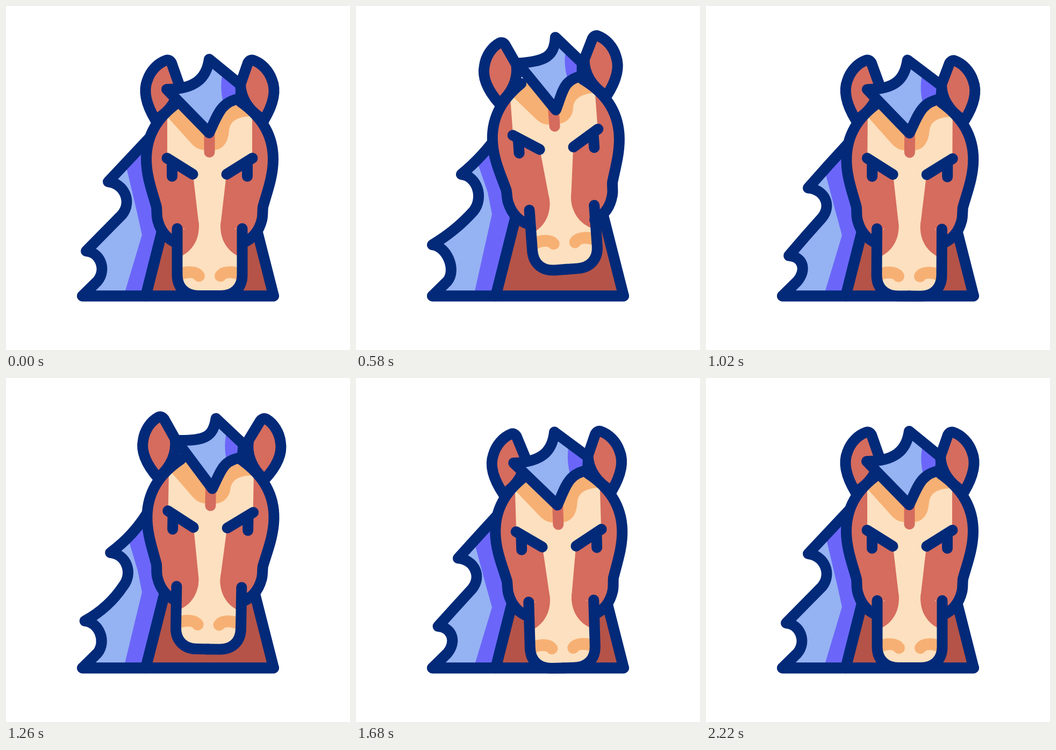
Recreate the animation shown at these times as an HTML page with a canvas. Size 640 by 640 pixels, loop 2.4 s.

```html
<!DOCTYPE html>
<html lang="en">
<head>
<meta charset="utf-8">
<title>Nodding horse</title>
<style>
  html, body { margin: 0; width: 100%; height: 100%; overflow: hidden; background: #fff; }
  canvas { display: block; width: 100vmin; height: 100vmin; }
</style>
</head>
<body>
<canvas width="640" height="640"></canvas>
<script>
const ctx = document.querySelector('canvas').getContext('2d');
const LOOP = 2400, STEP = 20, AXIS = 379, PIVOT_Y = 345, GROUND = 539.5;
const NAVY = '#022a79', COAT = '#d56c5e', NECK = '#b55348', CREAM = '#fce0bf',
      ORANGE = '#f7b073', SKY = '#95b2f3', VIOLET = '#6b66f9';

// Smooth track through key values, flat at every extreme; rests at 0 on both ends.
const times = [180, 360, 620, 780, 930, 1150, 1260, 1510, 1840, 2220];
function track(...inner) {
  const v = [0, ...inner, 0];
  const sec = i => (v[i + 1] - v[i]) / (times[i + 1] - times[i]);
  const slope = v.map((_, i) => {
    if (!i || i === v.length - 1) return 0;
    const a = sec(i - 1), b = sec(i);
    return a * b > 0 ? 2 * a * b / (a + b) : 0;
  });
  return t => {
    if (t <= times[0] || t >= times.at(-1)) return 0;
    const i = times.findIndex(k => k > t) - 1;
    const h = times[i + 1] - times[i], u = (t - times[i]) / h, w = 1 - u;
    return w * w * ((1 + 2 * u) * v[i] + u * h * slope[i]) +
           u * u * ((3 - 2 * u) * v[i + 1] - w * h * slope[i + 1]);
  };
}

const tracks = {
  skull: track(-11, -40, -8, 20, -33, -25.5, 13.5, -10.5),
  face:  track(-19, -50, -20.6, 25, -42, -34.5, 17, -14.5),
  tilt:  track(0, -5, -7.6, -3, 3.5, 1, -2.2, -1),
  splay: track(2.5, 7, 11, -6, 13, 11, -7, 9),
  tipX:  track(11, 14, 11, -14, 12, 8, -10, 6),
  tipY:  track(-14, -42, -13, 22, -34, -24, 16, -12),
  lockA: track(-7, -14, 3, 24, -10, -2, 22, -4),
  lockB: track(-6, -12, -1, 18, -8, -4, 18, -5),
  bend:  track(2, 4, 0, -3, 5, 6, -3.5, 3)
};

function draw(d, fill, stroke, width = 20) {
  const path = new Path2D(d);
  if (fill) { ctx.fillStyle = fill; ctx.fill(path); }
  if (stroke) { ctx.strokeStyle = stroke; ctx.lineWidth = width; ctx.stroke(path); }
}

function within(d, paint) {
  ctx.save();
  ctx.clip(new Path2D(d));
  paint();
  ctx.restore();
}

function flip(paint) {
  ctx.save();
  ctx.translate(2 * AXIS, 0);
  ctx.scale(-1, 1);
  paint();
  ctx.restore();
}

function both(paint) {
  paint();
  flip(paint);
}

function shifted(dx, dy, paint) {
  ctx.save();
  ctx.translate(dx, dy);
  paint();
  ctx.restore();
}

function rotated(degrees, x, y, paint) {
  ctx.save();
  ctx.translate(x, y);
  ctx.rotate(degrees * Math.PI / 180);
  ctx.translate(-x, -y);
  paint();
  ctx.restore();
}

function drawMane({ face, tilt, lockA, lockB, bend }) {
  const sx = 268, sy = 244 + lockA * .7;
  const ax = 190 - face * .12, ay = 327 + lockA;
  const ex = 216 - face * .06, ey = 388 + lockA * .5;
  const bx = 149 + lockB * .6, by = 456 + lockB;
  const curve = (x0, y0, x1, y1) =>
    `Q${(x0 + x1) / 2 + 1.4 * bend} ${(y0 + y1) / 2 + 1.4 * bend} ${x1} ${y1}`;
  const mane = `M${sx} ${sy}${curve(sx, sy, ax, ay)}
    C${ax + 30} ${ay + 3} ${ex + 19} ${ey - 24} ${ex} ${ey}${curve(ex, ey, bx, by)}
    C${bx + 26} ${by + 2} 188 490 170 512L142 ${GROUND}H260L300 380Z`;
  const sway = 1.1 * tilt - .5 * lockA, drop = face * .8;
  draw(mane, SKY);
  within(mane, () => draw(`M${218 + sway} 275L${244 + sway * .4} ${385 + drop}
    L253 ${426 + drop}L219 ${GROUND}H320V200H${218 + sway}Z`, VIOLET));
  draw(mane, null, NAVY);
  draw(`M260 ${GROUND}L300 382H458L498 ${GROUND}Z`, NECK, NAVY);
}

function drawEar(splay) {
  rotated(-splay, 284, 202, () => draw(`M278 212C260 182 255 158 263 138
    C269 120 283 106 298 101Q304 99 308 106L322 146C321 172 306 196 278 212Z`, COAT, NAVY));
}

function drawFace({ skull, face, tilt }) {
  const half = `M322 178C282 206 261 240 261 285C261 318 273 348 280 374
    C281 384 280 390 282 398C287 418 298 433 318 441`;
  const muzzle = `M318.5 ${414 + skull}V${500 + face}
    C318.5 ${525 + face} 335 ${539 + face} 358 ${539 + face}H380`;
  const turn = -tilt * .4, lag = skull - face;
  shifted(0, skull, () => both(() => draw(half + 'H380V178Z', COAT)));
  shifted(turn, 0, () => both(() => draw(muzzle + `V${414 + skull}Z`, CREAM)));
  shifted(0, skull, () => both(() => draw('M300 395L320 435L330 441V380Z', COAT)));
  shifted(0, face, () => {
    both(() => draw(`M300 200V288L348 314L358 400C363 432 346 458 322 467V500
      C322 525 339 537 358 537H380V200Z`, CREAM));
    both(() => draw('M322 420V467C346 458 363 432 358 400Z', COAT));
    draw(`M300 199L322 184H436L457 ${200 + lag}V${205 + lag}
      C430 ${206 + lag} 417 ${214 + lag} 415 ${232 + lag}
      C413 256 402 268 385 268H370C360 268 353 264 346 257L300 206Z`, ORANGE);
    draw('M378.5 235V272', null, COAT);
  });
  shifted(turn, face * 1.25, () =>
    both(() => draw('M322 500C336 493 354 494 359 502', null, ORANGE, 22)));
  shifted(0, face, () => both(() => draw('M299.5 283L347.5 313M309 290V317', null, NAVY)));
  shifted(turn, 0, () => both(() => draw(muzzle, null, NAVY)));
  shifted(0, skull, () => both(() => draw(half, null, NAVY)));
}

function drawForelock({ skull, face, tipX, tipY }) {
  const lx = 299 - face * .4, ly = 155 + face * 1.1;
  const tx = 378 + tipX, ty = 99 + tipY;
  const vx = 378 - face * .1, vy = 236 + face * .88;
  const hair = `M${lx} ${ly}C${lx + 52} ${ly} ${tx - 5} ${ty + 36} ${tx} ${ty}
    L438 ${148 + skull}L436 ${172 + skull}
    C400 ${178 + skull} ${vx + 17} ${vy - 36} ${vx} ${vy}Z`;
  const x = 400 + tipX * .4, y = 155 + skull;
  draw(hair, SKY);
  within(hair, () => draw(`M${x + 7} ${y - 45}C${x - 2} ${y - 15} ${x - 2} ${y + 5}
    ${x + 8} ${y + 40}H470V${y - 45}Z`, VIOLET));
  draw(hair, null, NAVY);
}

function render(t) {
  const pose = {};
  for (const name in tracks) pose[name] = tracks[name](t);
  const ear = () => drawEar(pose.splay);

  ctx.fillStyle = '#fff';
  ctx.fillRect(0, 0, 640, 640);
  ctx.lineCap = ctx.lineJoin = 'round';
  drawMane(pose);
  draw(`M142 ${GROUND}H498`, null, NAVY);

  rotated(pose.tilt, AXIS, PIVOT_Y, () => {
    drawFace(pose);
    shifted(0, pose.skull, ear);
    drawForelock(pose);
    shifted(0, pose.skull, () => flip(ear));
  });
}

function frame() {
  const t = performance.now() % LOOP;
  render(Math.floor(t / STEP) * STEP);
  requestAnimationFrame(frame);
}
frame();
</script>
</body>
</html>
```
